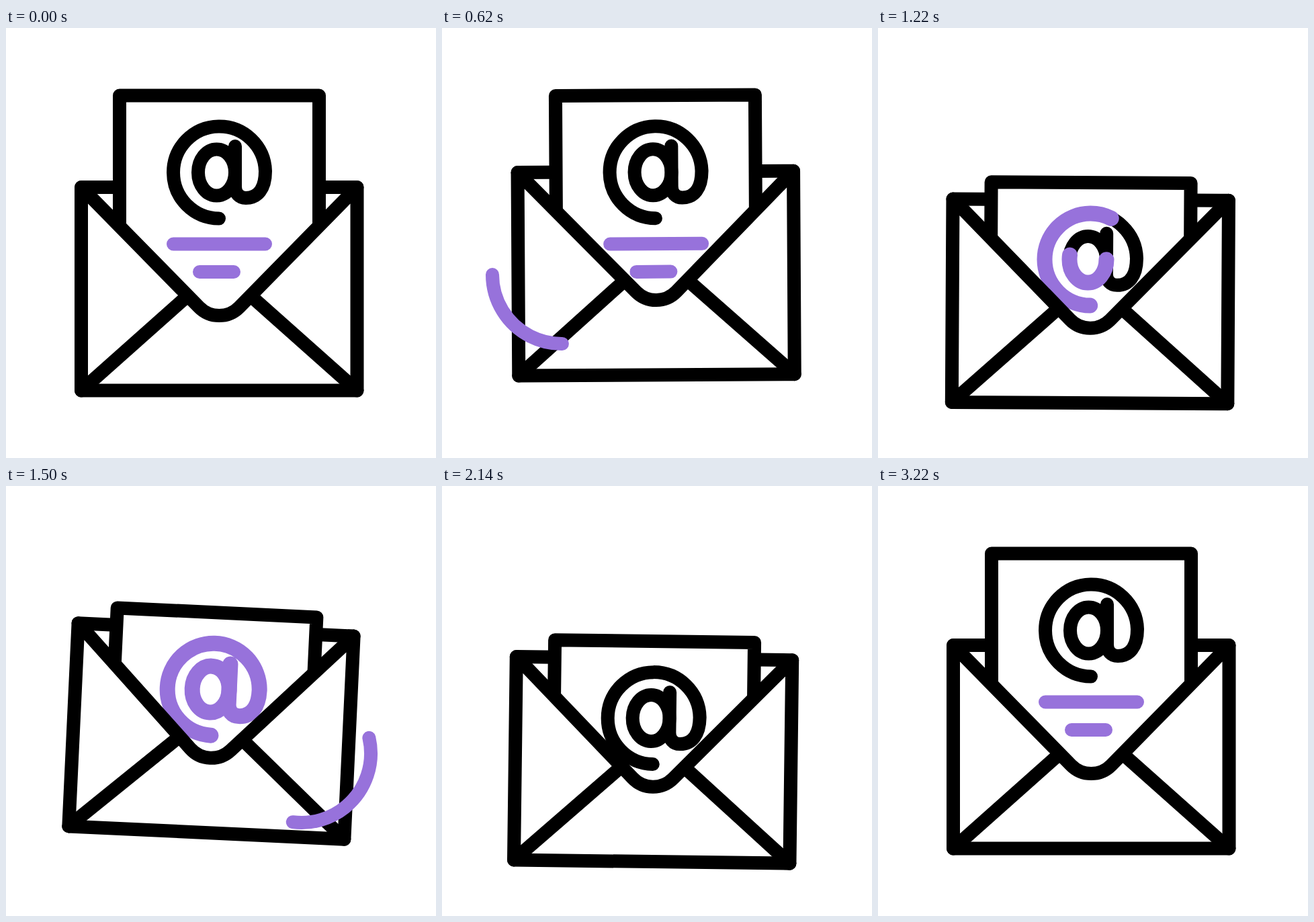
Animation of 640 by 640 pixels, one loop 3.54 s. Source, as an HTML page:

```html
<!DOCTYPE html>
<html lang="en">
<head>
<meta charset="utf-8">
<title>Mail</title>
<style>
  html, body { margin: 0; width: 100%; height: 100%; overflow: hidden; background: #fff; }
  svg { display: block; width: 100vw; height: 100vh; }
  .ink, .tint { fill: none; stroke: #000; stroke-width: 20; stroke-linecap: round; stroke-linejoin: round; }
  .tint { stroke: #9772db; }
  .bold { stroke-width: 23; }
  .paper { fill: #fff; }
</style>
</head>
<body>
<svg viewBox="0 0 640 640">
  <defs>
    <path id="ring" d="M317 283.5A68.5 68.5 0 1 1 386 213C386 240 374 253 357 253C347 253 341 246 341 236V176" pathLength="1"/>
    <ellipse id="bowl" cx="313.5" cy="215" rx="27.5" ry="34.5" pathLength="1"/>
  </defs>
  <g id="mail">
    <path class="ink" d="M112 237H522.5"/>
    <g id="letter">
      <path class="ink paper" d="M169 330V100.5H466V330"/>
      <use href="#ring" class="ink"/>
      <use href="#bowl" class="ink"/>
      <use href="#ring" class="tint bold"/>
      <use href="#bowl" class="tint bold"/>
      <path class="tint" d="M249 321.5H386M288 363H339"/>
    </g>
    <path class="ink paper" d="M112 237L287.3 415.5A42 42 0 0 0 347.3 415.5L522.5 237V539.5H112Z"/>
    <path class="ink" d="M112 539.5L266 402.5M522.5 539.5L368.5 402.5"/>
  </g>
  <g id="arcs"></g>
</svg>
<script>
const LOOP = 3540, STEP = 20;
const $ = id => document.getElementById(id);
const glyphTints = document.querySelectorAll(".bold");

// Eased 0 to 1 between two times
function ramp(t, from, to) {
  const p = Math.min(1, Math.max(0, (t - from) / (to - from)));
  return p * p * (3 - 2 * p);
}

// Eased swing from rest through `count` alternating peaks and back to rest
function swing(t, start, beat, count, odd, even) {
  const peak = k => k < 1 || k > count ? 0 : k % 2 ? odd : even;
  const k = Math.floor((t - start) / beat);
  const from = start + k * beat;
  return peak(k) + (peak(k + 1) - peak(k)) * ramp(t, from, from + beat);
}

const tilt = t => swing(t, 530, 450, 4, -3.1, 3.1);
const hop = t => -39 * ramp(t, 230, 485) + 35.5 * ramp(t, 485, 775) + 3.5 * ramp(t, 940, 1032);
const lift = t => hop(t) + swing(t, 1032, 224, 5, 20, -24);
const slide = t => 111 * (ramp(t, 480, 960) - ramp(t, 2200, 2720));

// Shows the part of a path between two fractions of its length
function trim(el, from, to) {
  const on = to - from > 0.001;
  el.style.display = on ? "" : "none";
  if (!on) return;
  el.style.strokeDasharray = `${to - from} 9`;
  el.style.strokeDashoffset = -from;
}

// Arc stroke that draws on, holds and wipes off; angles in degrees clockwise
function swoosh(cx, cy, r, a0, a1, start, hold) {
  const point = a => {
    const rad = a * Math.PI / 180;
    return `${cx + r * Math.cos(rad)} ${cy + r * Math.sin(rad)}`;
  };
  const el = document.createElementNS("http://www.w3.org/2000/svg", "path");
  el.setAttribute("d", `M${point(a0)}A${r} ${r} 0 0 ${a1 > a0 ? 1 : 0} ${point(a1)}`);
  el.setAttribute("pathLength", 1);
  el.setAttribute("class", "tint");
  $("arcs").append(el);
  const wipe = start + hold;
  return t => trim(el, ramp(t, wipe, wipe + 240), ramp(t, start, start + 200));
}

const swooshes = [
  swoosh(178, 367, 103, 180, 54, 490, 250),
  swoosh(440, 398, 103, -13, 113, 1344, 250),
  swoosh(273, 285, 218, 138, 222, 2820, 160),
  swoosh(346, 285, 218, 42, -42, 2820, 160)
];

function draw(t) {
  $("mail").setAttribute("transform", `translate(0 ${lift(t)}) rotate(${tilt(t)} 317.3 138)`);
  $("letter").setAttribute("transform", `translate(0 ${slide(t)})`);
  for (const el of glyphTints) trim(el, ramp(t, 1560, 2020), ramp(t, 980, 1440));
  for (const show of swooshes) show(t);
}

const start = performance.now();
function tick() {
  const t = (performance.now() - start) % LOOP;
  draw(Math.floor(t / STEP) * STEP);
  requestAnimationFrame(tick);
}
draw(0);
requestAnimationFrame(tick);
</script>
</body>
</html>
```
